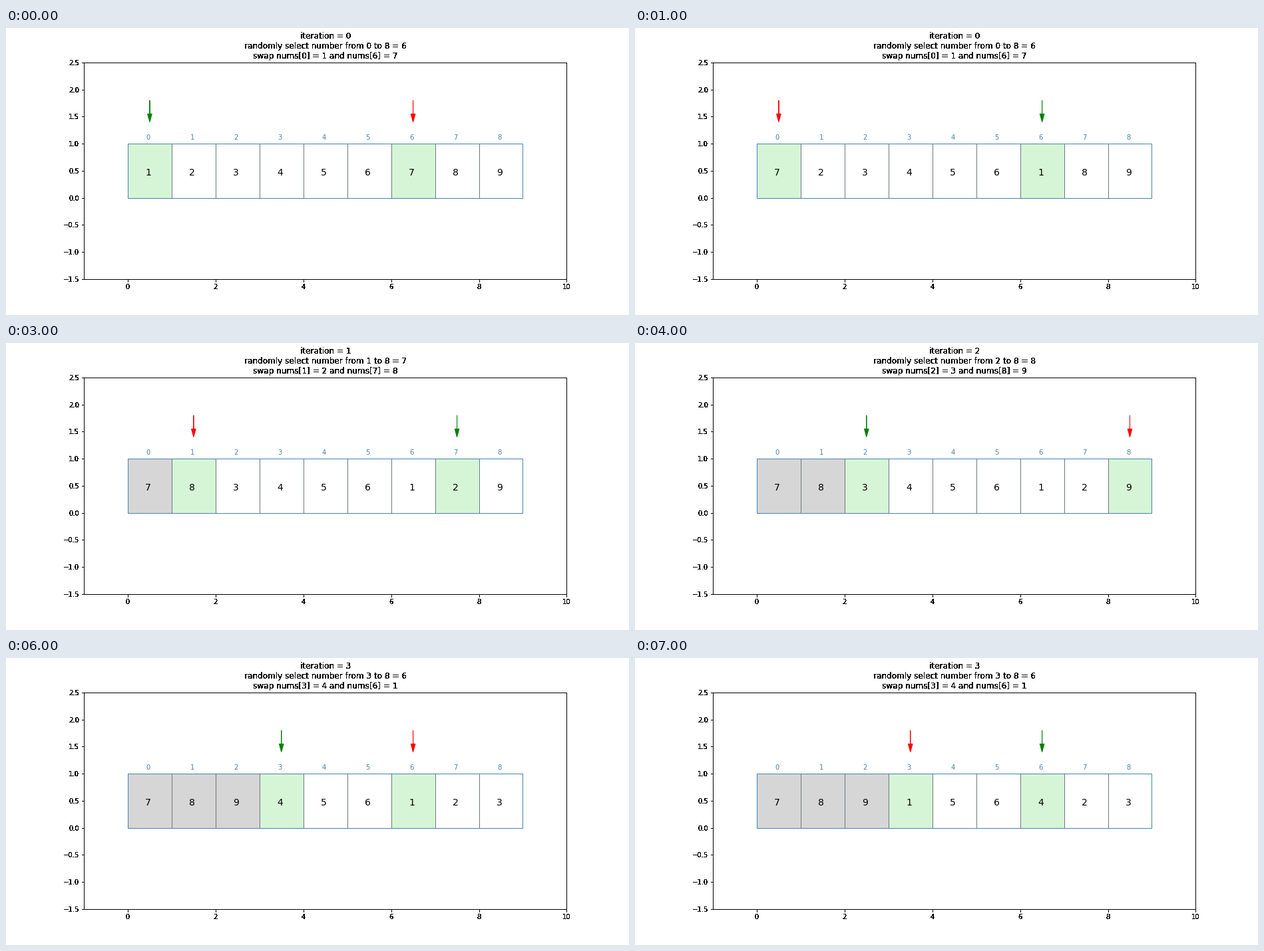
Write a matplotlib script that moves like this. It is 936 by 432 pixels and loops after 8 s.

```python
import matplotlib.pyplot as plt
from matplotlib.animation import FuncAnimation
from matplotlib.patches import Rectangle

plt.rcParams.update({"font.family": "DejaVu Sans", "font.size": 10})

COUNT = 9
SWAPS = [(0, 6), (1, 7), (2, 8), (3, 6)]
ACTIVE, DONE, PLAIN = "#d6f5d6", "#d6d6d6", "white"


def harden(image, dpi):
    """Turn soft edges into solid black pixels."""
    image[..., :3] = 0
    image[..., 3] = image[..., 3] > 0.2
    return image, 0, 0


fig = plt.figure(figsize=(13, 6), dpi=72, facecolor="white")
ax = fig.add_axes([0.125, 0.125, 0.775, 0.755])
ax.set(xlim=(-1, 10), ylim=(-1.5, 2.5), xticks=range(0, 11, 2))
title = ax.set_title(" ", fontsize=12)
for part in (title, ax.xaxis, ax.yaxis, *ax.spines.values()):
    part.set_agg_filter(harden)

cells, digits = [], []
for i in range(COUNT):
    cells.append(ax.add_patch(Rectangle((i, 0), 1, 1, lw=0, zorder=1)))
    digits.append(ax.text(i + 0.4, 0.41, "", fontsize=14))
    ax.text(i + 0.42, 1.08, str(i), fontsize=10, color="steelblue")
    if i:
        ax.plot([i, i], [0, 1], color="#6d7880", lw=1, zorder=2,
                solid_capstyle="butt")
ax.add_patch(Rectangle((0, 0), COUNT, 1, fill=False, ec="steelblue",
                       lw=1, zorder=3))
arrows = []


def point_at(i, color):
    arrows.append(ax.arrow(i + 0.5, 1.8, 0, -0.25, head_width=0.1,
                           head_length=0.15, color=color, lw=1))


def update(frame):
    step, swapped = divmod(frame, 2)
    nums = list(range(1, COUNT + 1))
    for a, b in SWAPS[:step]:
        nums[a], nums[b] = nums[b], nums[a]
    i, j = SWAPS[step]
    title.set_text(f"iteration = {step}\n"
                   f"randomly select number from {i} to {COUNT - 1} = {j}\n"
                   f"swap nums[{i}] = {nums[i]} and nums[{j}] = {nums[j]}")
    if swapped:
        nums[i], nums[j] = nums[j], nums[i]

    for k, (cell, digit) in enumerate(zip(cells, digits)):
        cell.set_facecolor(ACTIVE if k in (i, j) else DONE if k < i else PLAIN)
        digit.set_text(str(nums[k]))

    while arrows:
        arrows.pop().remove()
    point_at(i, "red" if swapped else "green")
    point_at(j, "green" if swapped else "red")
    return []


anim = FuncAnimation(fig, update, frames=2 * len(SWAPS), interval=1000,
                     init_func=lambda: [], repeat=True, repeat_delay=0,
                     blit=False)
plt.show()
```
